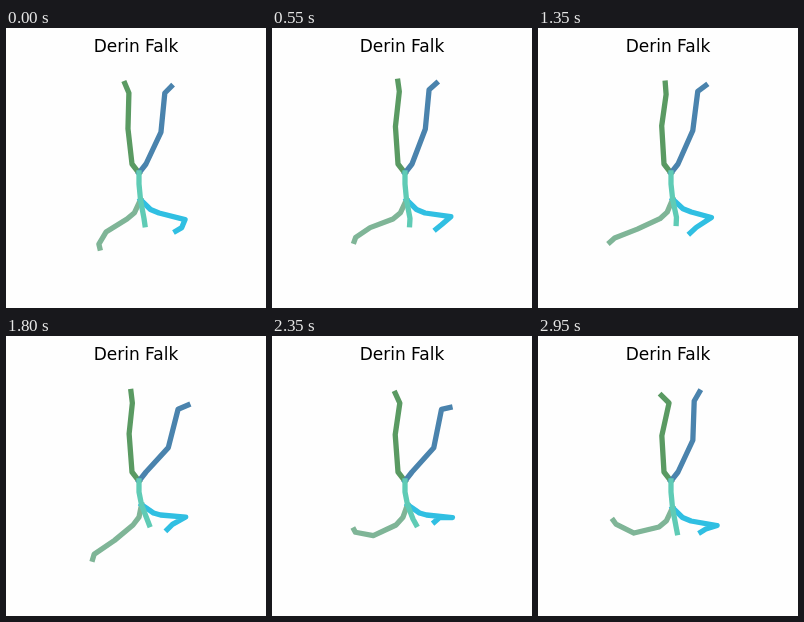
Recreate the animation shown at these times as an HTML page. Size 260 by 280 pixels, loop 3 s.

```html
<!DOCTYPE html>
<html lang="en">
<head>
<meta charset="utf-8">
<style>
  html, body { margin: 0; width: 100%; height: 100%; overflow: hidden; background: #fefefe; }
  svg { display: block; width: 260px; height: 280px; }
  text { font: 17px "DejaVu Sans", sans-serif; text-anchor: middle; }
  polyline { fill: none; stroke-width: 5.3; stroke-linecap: square; stroke-linejoin: round; }
</style>
</head>
<body>
<svg viewBox="0 0 260 280">
  <text x="130" y="24">Derin Falk</text>
</svg>
<script>
const LOOP = 3000, STEP = 50;
const COLORS = {
  leftLeg: "#5a9a62",
  rightLeg: "#4a83ad",
  leftArm: "#7fb597",
  rightArm: "#30bfe2",
  spine: "#5fcbb5"
};

// Smooth 0 to 1 between two times.
function ease(t, from, to) {
  const u = Math.min(1, Math.max(0, (t - from) / (to - from)));
  return u * u * (3 - 2 * u);
}

// Bell that reaches 1 at its peak time.
function pulse(t, peak, width) {
  return 1 / (1 + ((t - peak) / width) ** 2);
}

// Every joint is its rest position moved by a few overlapping gestures.
function pose(t) {
  const settle = Math.exp(-t / 400);
  const reach = pulse(t, 1350, 200);
  const kick = pulse(t, 2060, 300);
  const lift = ease(t, 900, 1500);
  const lean = ease(t, 1200, 1800) - ease(t, 2350, 2950);
  const finish = ease(t, 1800, 2950);
  const arc = 4 * finish * (1 - finish);

  const root = [133, 145];
  const neck = [134.5 + lean, 171.7 - 3 * lean];

  return {
    leftLeg: [
      root, [126, 136],
      [124 - 2 * settle - 1.5 * kick, 97.8 + 3 * settle + 2 * finish],
      [129 - 6 * settle - 4.5 * kick + 2.5 * finish, 63 + 2 * settle + 4 * lift],
      [128.5 - 9.5 * settle - 6 * kick - 4.4 * finish, 52.5 + 3 * settle + 3 * lift + 4 * finish]
    ],
    rightLeg: [
      root, [140, 136],
      [152 + 2.6 * settle + 18 * kick + finish, 99 + 4.6 * settle + 22 * kick + 3 * finish],
      [155.2 + 3 * settle + 29.5 * kick - 2 * finish, 59.5 + 5 * settle + 24 * kick + 3 * finish],
      [162.5 + 2 * settle + 34 * kick - 4.5 * finish, 53 + 5 * settle + 28 * kick + 4 * arc]
    ],
    leftArm: [
      neck,
      [128.5 + 4.5 * lean - 2 * arc, 184.7 - 3.5 * lean],
      [121 + 6 * lean - 3 * arc, 191 - 2 * lean],
      [97.5 + 2.5 * settle + 11 * lean - 6.5 * arc - 1.5 * finish,
        198 + 6 * settle + 2 * reach + 6 * lean - 4 * arc - finish],
      [81 + 12 * settle - 6 * reach + 8 * lean - 4 * arc - 3 * finish,
        207 + 9 * settle + reach + 11 * lean - 13 * arc - 19 * finish],
      [79 + 15 * settle - 9 * reach + 9 * lean - 4 * arc - 3.5 * finish,
        211 + 9 * settle + reach + 12 * lean - 17 * arc - 26.5 * finish]
    ],
    rightArm: [
      neck,
      [144.5 + 3 * lean, 181.5 - 4.5 * lean],
      [153 + 1.5 * lean, 185 - 6 * lean],
      [179.2 - 6 * reach + 1.5 * lean, 187.5 + 4 * settle + 3 * reach - 7 * lean + 2 * finish],
      [168 + 8 * settle - 10 * reach,
        195.5 + 4 * settle + 5 * reach - 8 * lean - 5 * arc - 2.5 * finish],
      [163 + 7 * settle - 11 * reach,
        200 + 3 * settle + 6 * reach - 7.5 * lean - 5 * arc - 4 * finish]
    ],
    spine: [
      root, [133, 156], neck,
      [138 + 3 * lean, 190.5 - 7.5 * lean],
      [137.2 + 1.7 * settle + 6 * lean + 2 * finish, 196.7 - 8 * lean]
    ]
  };
}

const svg = document.querySelector("svg");
const limbs = {};
for (const [name, color] of Object.entries(COLORS)) {
  limbs[name] = document.createElementNS("http://www.w3.org/2000/svg", "polyline");
  limbs[name].setAttribute("stroke", color);
  svg.append(limbs[name]);
}

function draw(t) {
  for (const [name, joints] of Object.entries(pose(t))) {
    limbs[name].setAttribute("points", joints.join(" "));
  }
}

const start = performance.now();
function tick() {
  const t = (performance.now() - start) % LOOP;
  draw(Math.floor(t / STEP) * STEP);
  requestAnimationFrame(tick);
}
tick();
</script>
</body>
</html>
```
